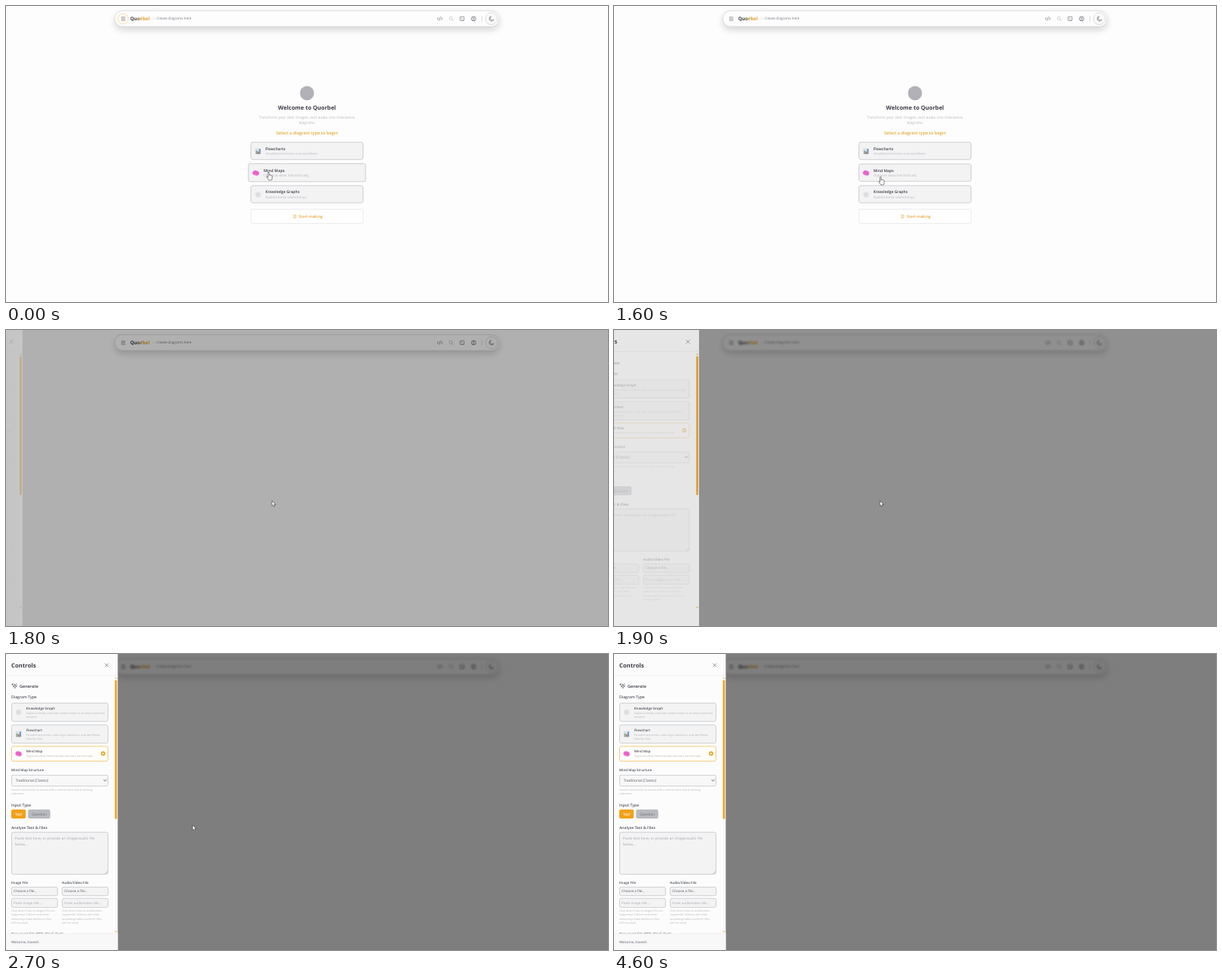
Write an HTML page that moves like this. It is 800 px wide and 394 px high and loops after 4.7 s.

```html
<!DOCTYPE html>
<html lang="en">
<head>
<meta charset="utf-8">
<title>Diagram maker</title>
<style>
html, body { margin: 0; width: 100%; height: 100%; overflow: hidden; background: #fdfdfd; }
svg { display: block; width: 100vw; height: 100vh; }
text { font-family: "Open Sans", "Noto Sans", sans-serif; text-rendering: geometricPrecision; white-space: pre; }
</style>
</head>
<body>
<svg id="stage" viewBox="0 0 800 394"></svg>
<script>
const INK = '#3c3e48', MUTED = '#b6b7be', ORANGE = '#e6a62e', LINE = '#bfc0c5', FILL = '#f3f3f4';
const LOOP = 4700, STEP = 100, PANEL = 148.5;

const rect = (x, y, w, h, r, fill, stroke = 'none', sw = 0.8, extra = '') =>
  `<rect x="${x}" y="${y}" width="${w}" height="${h}" rx="${r}" fill="${fill}" stroke="${stroke}" stroke-width="${sw}" ${extra}/>`;
const circle = (x, y, r, fill, stroke = 'none', sw = 0.8, extra = '') =>
  `<circle cx="${x}" cy="${y}" r="${r}" fill="${fill}" stroke="${stroke}" stroke-width="${sw}" ${extra}/>`;
const path = (d, stroke, sw = 0.8, fill = 'none') =>
  `<path d="${d}" stroke="${stroke}" stroke-width="${sw}" fill="${fill}" stroke-linecap="round" stroke-linejoin="round"/>`;
// y is the visual middle of the line
const label = (x, y, str, size, fill = INK, weight = 400, anchor = 'start') =>
  `<text x="${x}" y="${y + size * 0.35}" font-size="${size}" fill="${fill}" font-weight="${weight}" text-anchor="${anchor}">${str}</text>`;
const lines = (x, y, gap, rows, size, fill) =>
  rows.map((row, i) => label(x, y + i * gap, row, size, fill)).join('');
const group = (id, body, attrs = '') => `<g id="${id}" ${attrs}>${body}</g>`;

const icons = {
  chart: (x, y) => rect(x - 4, y - 4, 8, 8, 0.6, '#dde2ea') + rect(x - 3, y - 0.8, 1.7, 4.6, 0, '#62b576') +
    rect(x - 0.8, y + 0.4, 1.7, 3.4, 0, '#d8585c') + rect(x + 1.4, y - 3, 1.7, 6.8, 0, '#5a88cc'),
  brain: (x, y) => path(`M${x - 4} ${y - 0.8}c.5-2.3 3.3-3 4.800-2 2.200 0 3.500 1.800 3 3.300 .5 1.500-.6 2.500-1.900 2.400-1.100.9-2.300.2-2.700-.5-1.900.3-3.800-1-3.200-3.200z`, '#e250c0', 0.3, '#ef66cf') +
    path(`M${x - 2.3} ${y - 0.5}q1.5-1.4 2.5 0t2.500.3`, '#cf3fae', 0.4),
  graph: (x, y) => circle(x, y, 3.6, '#dedee1')
};

function header() {
  const icon = '#767882';
  return rect(144.5, 6.3, 511, 21, 10.5, '#fdfdfd', '#d0d0d3', 0.7, 'filter="url(#shadow)"') +
    circle(155.5, 17, 7, '#fffcf5', '#f2cf8e', 0.7, 'id="ring"') +
    path('M153.4 14.9h4.800M153.4 17h4.800M153.4 19.1h4.800', '#6a6c76', 0.7) +
    label(165, 17, 'Quorbel', 6.4, 'url(#brand)', 700) +
    label(194, 16.8, '—', 4, '#b4b4b8') +
    label(200, 16.8, 'Create diagrams here', 4.65, '#74767f') +
    path('M574.8 15.2l-1.8 1.7 1.8 1.7M578.3 15.2l1.8 1.7-1.8 1.7M577.2 14.6l-1.3 4.6', icon, 0.7) +
    circle(591.1, 16.4, 2.1, 'none', '#b0b1b7', 0.6) + path('M592.7 18l1.7 1.7', '#b0b1b7', 0.6) +
    rect(603.4, 14.3, 5.4, 5.2, 0.7, 'none', icon, 0.7) + path('M605 16l1.1.9-1.1.9M606.5 18h1', icon, 0.5) +
    circle(621.4, 16.9, 3, 'none', icon, 0.8) + circle(621.4, 16, 1, 'none', icon, 0.7) + path('M619.5 18.9q1.9-1.8 3.8 0', icon, 0.7) +
    path('M632.3 13.7v6.5', '#ccccd0', 0.7) +
    circle(645, 16.8, 8, '#fafafa', '#cdcdd1', 0.7) +
    path('M644.2 13.8a3.2 3.2 0 1 0 4 4.300a2.900 2.900 0 0 1-4-4.300z', '#6a6c76', 0.7);
}

function choice(y, icon, title, note) {
  return rect(325.5, y, 149, 23, 2.5, FILL, LINE, 0.75) + icons[icon](335, y + 12) +
    label(344.7, y + 8.5, title, 5.05, INK, 600) + label(344.7, y + 15.4, note, 4.35, MUTED);
}

function welcome() {
  return circle(400, 116, 9.4, '#b3b1b8') +
    label(400, 135.8, 'Welcome to Quorbel', 7.55, INK, 700, 'middle') +
    label(400, 148, 'Transform your text, images, and audio into interactive', 5, MUTED, 400, 'middle') +
    label(400, 155.7, 'diagrams', 5, MUTED, 400, 'middle') +
    label(400, 168.8, 'Select a diagram type to begin', 5.65, ORANGE, 600, 'middle') +
    choice(181.3, 'chart', 'Flowcharts', 'Visualize processes and workflows') +
    group('hoverCard', choice(210.3, 'brain', 'Mind Maps', 'Organize ideas hierarchically')) +
    choice(239.1, 'graph', 'Knowledge Graphs', 'Explore entity relationships') +
    rect(325.5, 270.5, 149, 19, 2.5, '#fefefe', '#e6e6e8', 0.7) +
    group('startIcon', [278.4, 280.2, 282].map(y => path(`M381.5 ${y}h3.600`, ORANGE, 0.6)).join('')) +
    label(389, 280, 'Start making', 5.1, ORANGE, 600);
}

function option(y, h, icon, title, note, active) {
  return rect(7.5, y + 0.3, 128, h - 0.6, 2.4, active ? '#fffefb' : FILL, active ? '#eeb74e' : LINE, 0.75) +
    icons[icon](16.7, y + h / 2) +
    label(26.7, y + 7.2, title, 4.5, '#50525c', 600) +
    lines(26.7, y + 13.3, 5, note, 3.75, MUTED);
}

const field = (x, y, w, h, fill = FILL) => rect(x, y, w, h, 2.2, fill, LINE, 0.75);

function upload(x, title, url, help) {
  return label(x, 304.7, title, 4.5, '#50525c', 600) +
    field(x + 0.4, 310.3, 61, 11.4) + label(x + 3, 315.8, 'Choose a file...', 4.6, '#5c5e68') +
    field(x + 0.4, 325.3, 61, 12) + label(x + 3, 331.2, url, 4.45, '#a9aab2') +
    lines(x, 341.7, 5.4, [help, 'supported. Vidorra and other', 'streaming/video platform URLs', 'will not work.'], 3.7, MUTED);
}

function panelBody() {
  return path('M11.8 40.3l.7 2 2 .7-2 .7-.7 2-.7-2-2-.7 2-.7zM8.8 39.5v2M7.8 40.5h2M13.8 39.5v1.6', '#4c4e58', 0.65) +
    label(18, 43, 'Generate', 5.6, INK, 600) +
    label(7, 57, 'Diagram Type', 5.1, '#50525c', 600) +
    option(65, 25, 'graph', 'Knowledge Graph', ['Explore entities and their relationships in an interconnected', 'network.']) +
    option(94, 25, 'chart', 'Flowchart', ['Visualize processes, code logic, decisions, and workflows', 'step-by-step.']) +
    option(122.6, 20.4, 'brain', 'Mind Map', ['Organize ideas hierarchically around a central topic'], true) +
    circle(129, 132.5, 2.9, ORANGE) + circle(129, 132.5, 1.1, '#fff') +
    label(7, 154.5, 'Mind Map Structure', 4.5, '#50525c', 600) +
    field(7.5, 161.3, 128, 14.5, '#f8f8f8') +
    label(12.7, 168.6, 'Traditional (Classic)', 4.9, '#555762') +
    path('M130 167.5l1.7 1.7 1.7-1.7', '#333', 0.8) +
    lines(7, 180.7, 5.3, ['Classic hierarchical structure with a central topic and branching', 'subtopics.'], 3.7, MUTED) +
    label(7, 200.9, 'Input Type', 5.1, '#50525c', 600) +
    rect(7, 207, 19.3, 12, 2.2, '#f2a01a') + label(16.7, 213, 'Text', 4.6, '#fff', 600, 'middle') +
    rect(29.2, 207, 29.7, 12, 2.2, '#b9bac0') + label(44, 213, 'Question', 4.6, '#666872', 400, 'middle') +
    label(7, 231.2, 'Analyze Text &amp; Files', 5.1, '#50525c', 600) +
    field(7.5, 237.2, 128, 56) +
    lines(11.7, 245, 8, ['Paste text here, or provide an image/audio file', 'below...'], 4.95, '#a9aab2') +
    path('M132 292l2.5-2.5M133.7 292l.8-.8', '#888', 0.5) +
    upload(7, 'Image File', 'Paste image URL...', 'Only direct links to image files are') +
    upload(74.3, 'Audio/Video File', 'Paste audio/video URL...', 'Only direct links to audio/video');
}

function panel() {
  return rect(0, 0, PANEL, 394, 0, '#fcfcfc') +
    group('panelHead', label(7, 14.8, 'Controls', 7.8, INK, 700) +
      path('M131.7 12.8l4.2 4.2M135.9 12.8l-4.2 4.2', '#666872', 0.7)) +
    path('M0 28.5H148.5', '#ececee', 0.7) +
    group('panelBody', panelBody()) +
    rect(144.7, 35, 2.7, 184.5, 0, '#f0a31f') +
    path('M145.2 32.5l.9-1.2.9 1.2zM145.2 369l.9 1.2.9-1.2z', ORANGE, 0.4, ORANGE) +
    group('panelFoot', label(7, 372.5, 'Document File (PDF, Word, Text)', 4.5, '#50525c', 600) +
      rect(0, 372.2, PANEL, 21.8, 0, '#f8f8f9') + path('M0 372.2H148.5', '#e8e8ea', 0.6) +
      label(7, 383, 'Welcome, Dovesh', 4.45, '#5c5e68'));
}

const hand = path('M0 .8q0-1.2.9-1.2t.9 1.2v3.1l.2-.5q.9-.5 1.3.3 1-.3 1.2.5 1.2-.1 1.2 1v2.3q0 1.7-1 2.8h-3.3q-1.3-1.5-2.7-3.6-.5-1 .3-1.2l1 .8z', '#333', 0.6, '#fff');
const arrow = path('M0 0v6.4l1.5-1.3 1 2.3 1.1-.5-1-2.2h2z', '#333', 0.55, '#fff');

const stage = document.getElementById('stage');
stage.innerHTML = `<defs>
  <linearGradient id="brand" gradientUnits="userSpaceOnUse" x1="165" x2="191" y1="0" y2="0">
    <stop offset=".25" stop-color="#38383e"/><stop offset=".65" stop-color="#e8a422"/><stop offset="1" stop-color="#e8a422"/>
  </linearGradient>
  <filter id="shadow" x="-5%" y="-80%" width="110%" height="320%">
    <feDropShadow dx="0" dy="4" stdDeviation="4" flood-color="#000" flood-opacity=".16"/>
  </filter></defs>` +
  rect(0, 0, 800, 394, 0, '#fdfdfd') +
  group('page', header() + group('welcome', welcome())) +
  group('shade', rect(0, 0, 800, 394, 0, '#000')) +
  group('panel', panel()) + group('hand', hand) + group('arrow', arrow);

const el = id => document.getElementById(id);
const set = (id, attr, value) => el(id).setAttribute(attr, value);
const show = (id, on) => set(id, 'visibility', on ? 'visible' : 'hidden');

// keys: [time, value] pairs, linear in between
function track(t, ...keys) {
  if (t <= keys[0][0]) return keys[0][1];
  for (let i = 1; i < keys.length; i++) {
    const [t0, a] = keys[i - 1], [t1, b] = keys[i];
    if (t < t1) return a + (b - a) * (t - t0) / (t1 - t0);
  }
  return keys[keys.length - 1][1];
}

function render(t) {
  const opened = t >= 1700;
  show('welcome', !opened);
  set('ring', 'opacity', track(t, [0, 1], [300, 0]));
  const scale = track(t, [0, 1.045], [100, 1.05], [1000, 1.05], [1200, 1]);
  set('hoverCard', 'transform', `translate(400 221.75) scale(${scale}) translate(-400 -221.75)`);
  set('startIcon', 'transform', `translate(${0.4 * Math.cos(t / 300)} 0)`);
  set('brand', 'gradientTransform', `translate(${2 * Math.sin(t / LOOP * Math.PI * 2)} 0)`);

  const blur = track(t, [1700, 0], [2000, 1.2]);
  el('page').style.filter = blur ? `blur(${blur}px)` : 'none';
  set('shade', 'opacity', track(t, [1600, 0], [1700, 0.115], [1800, 0.305], [1900, 0.43], [2000, 0.5]));

  const edge = track(t, [1700, 0], [1800, 22], [1900, 113], [2000, 145.5], [2100, PANEL]);
  const drop = track(t, [2000, 1], [2200, 0]);
  show('panel', edge > 0);
  set('panel', 'transform', `translate(${edge - PANEL} 0)`);
  set('panel', 'opacity', track(t, [1700, 0], [1800, 0.28], [1900, 0.8], [2000, 1]));
  set('panelHead', 'transform', `translate(0 ${drop * 0.6})`);
  set('panelBody', 'transform', `translate(0 ${drop})`);
  set('panelBody', 'opacity', track(t, [1800, 0.1], [2000, 0.68], [2300, 1]));
  set('panelFoot', 'opacity', track(t, [2000, 0], [2500, 1]));

  const x = track(t, [0, 348], [600, 353], [2100, 353.5], [2400, 282], [2700, 248], [2900, 250], [3000, 268], [3100, 295], [3200, 312]);
  const y = track(t, [0, 221.5], [600, 227.5], [2700, 228], [2900, 222], [3000, 180], [3100, 85], [3200, 4], [3300, -20]);
  set('hand', 'transform', `translate(${x} ${y})`);
  set('arrow', 'transform', `translate(${x} ${y})`);
  show('hand', !opened);
  show('arrow', opened);
}

const start = performance.now();
function tick() {
  const t = (performance.now() - start) % LOOP;
  render(Math.floor(t / STEP) * STEP);
  requestAnimationFrame(tick);
}
tick();
</script>
</body>
</html>
```
